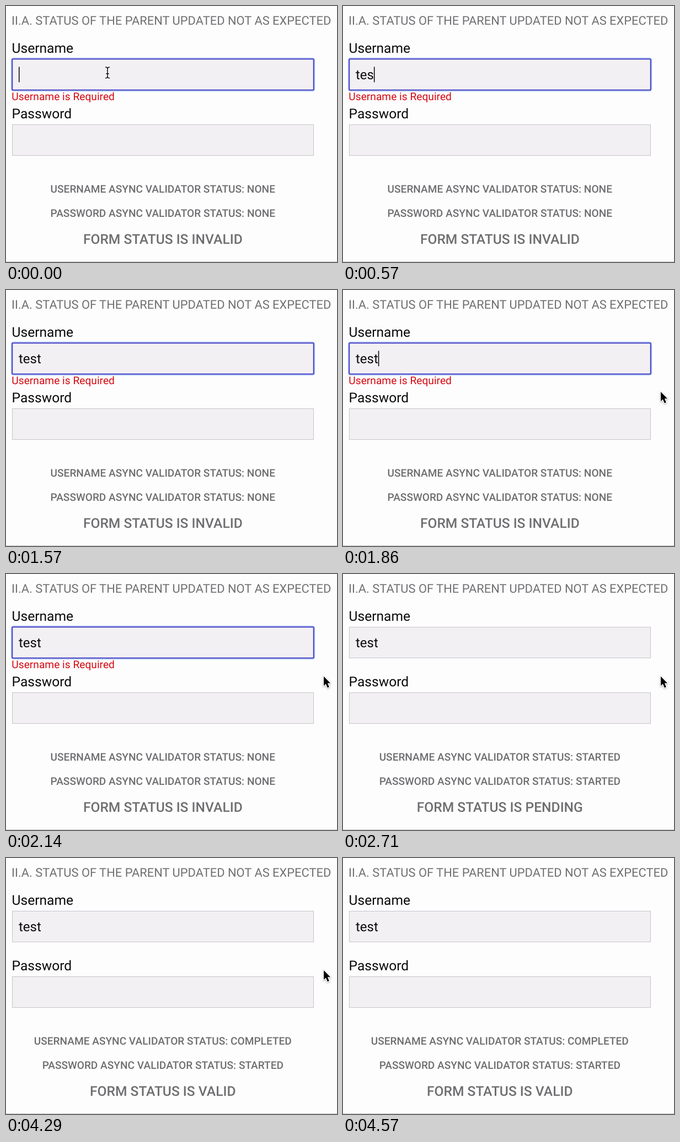
These frames come from a looping animation (600 px wide and 465 px high, 7710 ms). An HTML page with a canvas:

```html
<!DOCTYPE html>
<html lang="en">
<head>
<meta charset="utf-8">
<title>Form status</title>
<style>
  html, body { margin: 0; width: 100%; height: 100%; overflow: hidden; background: #fefdfe; }
  canvas { display: block; width: 600px; height: 465px; }
</style>
</head>
<body>
<canvas id="stage" width="600" height="465"></canvas>
<script>
const ctx = document.getElementById('stage').getContext('2d');
const LOOP = 7710;
const BLUR = 2710, FIRST_DONE = 3710;
const GREY = '#707072', BLACK = '#0a0a0a';
const FIELD = { x: 11, w: 547, h: 57 };
const INPUT_X = 23;

// Each step is [start time, value]; the latest started one applies.
const typing = [[0, ''], [140, 't'], [290, 'te'], [570, 'tes'], [710, 'test']];
const caretSteps = [[0, true], [1140, false], [1710, true], [2140, false]];
const pointer = [
  [0, null], [860, [191, 151]], [1000, [413, 171]], [1140, [491, 195]],
  [1290, [599.5, 194]], [1430, [600, 192]], [1570, null],
  [1710, [592, 185]], [1860, [576, 185]], [2000, [576, 186]],
  [4290, [576, 204]], [4570, null]
];

const at = (steps, t) => steps.filter(([start]) => start <= t).pop()[1];

function text(str, x, y, size, color = BLACK, align = 'left', weight = 400) {
  ctx.font = `${weight} ${size}px Roboto, sans-serif`;
  ctx.textAlign = align;
  ctx.fillStyle = color;
  ctx.fillText(str, x, y);
}

const status = (str, y, size = 19.1) => text(str, 284.3, y, size, '#6e6e70', 'center', 500);

function field(y, focused) {
  const { x, w, h } = FIELD;
  ctx.fillStyle = '#f2f0f3';
  ctx.fillRect(x, y, w, h);
  ctx.lineWidth = 1;
  ctx.strokeStyle = '#c6c4c8';
  ctx.strokeRect(x + 0.5, y + 0.5, w - 1, h - 1);
  if (!focused) return;
  const ring = (inset, width, color, radius) => {
    ctx.beginPath();
    ctx.roundRect(x + inset, y + inset, w - 2 * inset, h - 2 * inset, radius);
    ctx.lineWidth = width;
    ctx.strokeStyle = color;
    ctx.stroke();
  };
  ring(-0.5, 3.5, 'rgba(120, 170, 245, 0.6)', 3);
  ring(0.3, 1.8, '#4636c0', 1);
}

function caret(x) {
  ctx.fillStyle = '#000';
  ctx.fillRect(x, 110.5, 1.5, 28);
}

function arrow([x, y]) {
  const points = [[0, 0], [0, 17], [3.8, 13.4], [6.8, 20.5], [9.8, 19.2], [6.9, 12.2], [12, 12.2]];
  ctx.save();
  ctx.translate(x, y);
  ctx.beginPath();
  points.forEach(p => ctx.lineTo(...p));
  ctx.closePath();
  ctx.lineJoin = 'round';
  ctx.lineWidth = 2.6;
  ctx.strokeStyle = '#fff';
  ctx.shadowColor = 'rgba(0, 0, 0, 0.35)';
  ctx.shadowBlur = 3;
  ctx.shadowOffsetY = 1;
  ctx.stroke();
  ctx.shadowColor = 'transparent';
  ctx.fillStyle = '#000';
  ctx.fill();
  ctx.restore();
}

function iBeam(x, y) {
  ctx.save();
  ctx.translate(x, y);
  ctx.beginPath();
  for (const side of [-1, 1]) {
    ctx.moveTo(side * 4, -10);
    ctx.quadraticCurveTo(0, -10, 0, -7);
    ctx.lineTo(0, 7);
    ctx.quadraticCurveTo(0, 10, side * 4, 10);
  }
  ctx.moveTo(-2.8, 2);
  ctx.lineTo(2.8, 2);
  for (const [width, color] of [[3.4, '#fff'], [1.6, '#111']]) {
    ctx.lineWidth = width;
    ctx.strokeStyle = color;
    ctx.stroke();
  }
  ctx.restore();
}

function draw(t) {
  const focused = t < BLUR;
  const typed = at(typing, t);
  const tip = at(pointer, t);

  ctx.fillStyle = '#fefdfe';
  ctx.fillRect(0, 0, 600, 465);
  ctx.fillStyle = '#c4c3c5';
  ctx.fillRect(0, 464, 600, 1);

  text('II.A. STATUS OF THE PARENT UPDATED NOT AS EXPECTED', 10, 34, 21.9, GREY);
  text('Username', 10.5, 84.5, 24.6);
  text('Password', 10.5, 203.5, 24.6);
  field(96, focused);
  field(215, false);
  if (focused) text('Username is Required', 10.3, 171, 19.2, '#d5080f');

  text(typed, INPUT_X, 132.5, 24);
  if (at(caretSteps, t)) caret(INPUT_X + ctx.measureText(typed).width);

  const first = focused ? 'NONE' : t < FIRST_DONE ? 'STARTED' : 'COMPLETED';
  const second = focused ? 'NONE' : 'STARTED';
  const form = focused ? 'INVALID' : t < FIRST_DONE ? 'PENDING' : 'VALID';
  status('USERNAME ASYNC VALIDATOR STATUS: ' + first, 339, );
  status('PASSWORD ASYNC VALIDATOR STATUS: ' + second, 383);
  status('FORM STATUS IS ' + form, 432, 24.6);

  if (t < 140) iBeam(184, 121);
  if (tip) arrow(tip);
}

ctx.textRendering = 'geometricPrecision';
const origin = performance.now();
function tick() {
  draw((performance.now() - origin) % LOOP);
  requestAnimationFrame(tick);
}
tick();
</script>
</body>
</html>
```
